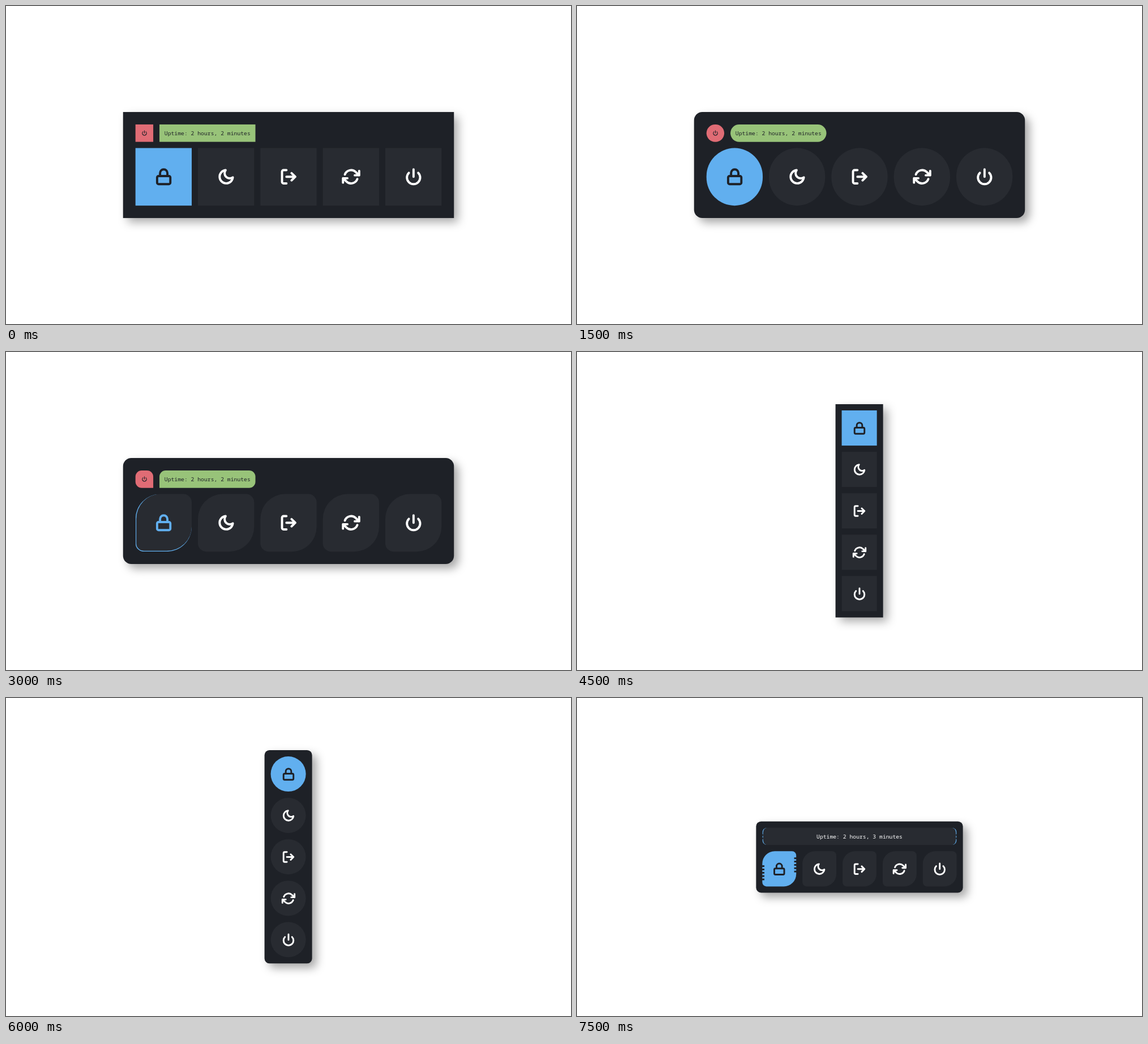
Write an HTML page that moves like this. It is 998 px wide and 561 px high and loops after 8 s.

```html
<!DOCTYPE html>
<html lang="en">
<head>
<meta charset="utf-8">
<title>Power menu</title>
<style>
  html, body { margin: 0; width: 100%; height: 100%; overflow: hidden; background: #fff; }
  #stage {
    position: absolute; width: 1366px; height: 768px;
    transform: scale(calc(998 / 1366)); transform-origin: 0 0;
  }
  .box {
    position: absolute; box-sizing: border-box;
    display: flex; align-items: center; justify-content: center;
    font: 13.333px "Noto Sans Mono", "DejaVu Sans Mono", monospace;
    white-space: pre; background: #282b31; color: #fff;
  }
  .panel { background: #1e2127; box-shadow: 11px 11px 22px rgba(0, 0, 0, .35); }
  .blue { background: #61afef; color: #1e2127; }
  .red { background: #e06c75; color: #1e2127; }
  .green { background: #98c379; color: #1e2127; }
  .outlined { color: #61afef; border: 0 solid; border-width: 0 0 2px 2px; padding: 2px 2px 0 0; }
  .sides { border: 0 solid #61afef; border-width: 0 2px; }
  .gap { background: #1e2127; }
  svg { display: block; overflow: visible; fill: none; stroke: currentColor;
        stroke-width: 3; stroke-linecap: round; stroke-linejoin: round; }
</style>
</head>
<body>
<div id="stage"></div>
<script>
const ICONS = {
  lock: 'M5 11h14a2 2 0 0 1 2 2v7a2 2 0 0 1-2 2H5a2 2 0 0 1-2-2v-7a2 2 0 0 1 2-2zM7 11V7a5 5 0 0 1 10 0v4',
  suspend: 'M21 12.79A9 9 0 1 1 11.21 3 7 7 0 0 0 21 12.79z',
  logout: 'M9 21H5a2 2 0 0 1-2-2V5a2 2 0 0 1 2-2h4M16 17l5-5-5-5M21 12H9',
  reboot: 'M23 4v6h-6M1 20v-6h6M3.51 9a9 9 0 0 1 14.85-3.36L23 10M1 14l4.64 4.36A9 9 0 0 0 20.49 15',
  power: 'M18.36 6.64a9 9 0 1 1-12.73 0M12 2v10'
};
const ACTIONS = Object.keys(ICONS);

const icon = (name, size) =>
  `<svg viewBox="0 0 24 24" width="${size}" height="${size}"><path d="${ICONS[name]}"/></svg>`;

const box = (x, y, w, h, kind = '', radius = '0', content = '') =>
  `<div class="box ${kind}" style="left:${x}px;top:${y}px;width:${w}px;height:${h}px;border-radius:${radius}">${content}</div>`;

// Five tiles, 15px apart, the first one selected.
const tiles = (x, y, w, h, iconSize, radius, selected = 'blue', vertical = false) =>
  ACTIONS.map((name, i) => box(
    x + (vertical ? 0 : i * (w + 15)), y + (vertical ? i * (h + 15) : 0), w, h,
    i ? '' : selected, radius, icon(name, iconSize))).join('');

// Gaps of a dashed edge: 4px wide every 8px.
const gaps = (x, y, w, count) =>
  Array.from({ length: count }, (_, i) => box(x, y + i * 8, w, 4, 'gap')).join('');

const wideMenu = (panelRadius, badgeRadius, uptimeRadius, tileRadius, selected) =>
  box(283, 256, 800, 256, 'panel', panelRadius) +
  box(313, 286, 43, 42, 'red', badgeRadius, icon('power', 13.333)) +
  box(371, 286, 232, 42, 'green', uptimeRadius, 'Uptime: 2 hours, 2 minutes') +
  tiles(313, 343, 136, 139, 42.667, tileRadius, selected);

const sideMenu = (panelRadius, tileRadius) =>
  box(625, 126, 115, 515, 'panel', panelRadius) +
  tiles(640, 141, 85, 85, 32, tileRadius, 'blue', true);

const compactMenu = () =>
  box(433, 298, 500, 172, 'panel', '12px') +
  box(448, 313, 470, 42, 'sides', '12px', 'Uptime: 2 hours, 3 minutes') +
  gaps(447, 329, 3, 2) + gaps(916, 329, 3, 2) +
  tiles(448, 370, 82, 85, 32, '30px 10px') +
  gaps(447, 404, 6, 5) + gaps(525, 385, 6, 5);

const SCENES = [
  wideMenu('0', '0', '0', '0'),
  wideMenu('20px', '100px', '100px', '100px'),
  wideMenu('20px', '15px 15px 0 15px', '15px 15px 15px 0', '60px 20px', 'outlined'),
  sideMenu('0', '0'),
  sideMenu('12px', '100px'),
  compactMenu()
];
const SCENE_MS = 1500, LOOP_MS = 8000;

const stage = document.getElementById('stage');
const start = performance.now();
let shown = -1;

function draw() {
  const scene = Math.floor((performance.now() - start) % LOOP_MS / SCENE_MS);
  if (scene !== shown) stage.innerHTML = SCENES[shown = scene];
  requestAnimationFrame(draw);
}
draw();
</script>
</body>
</html>
```
